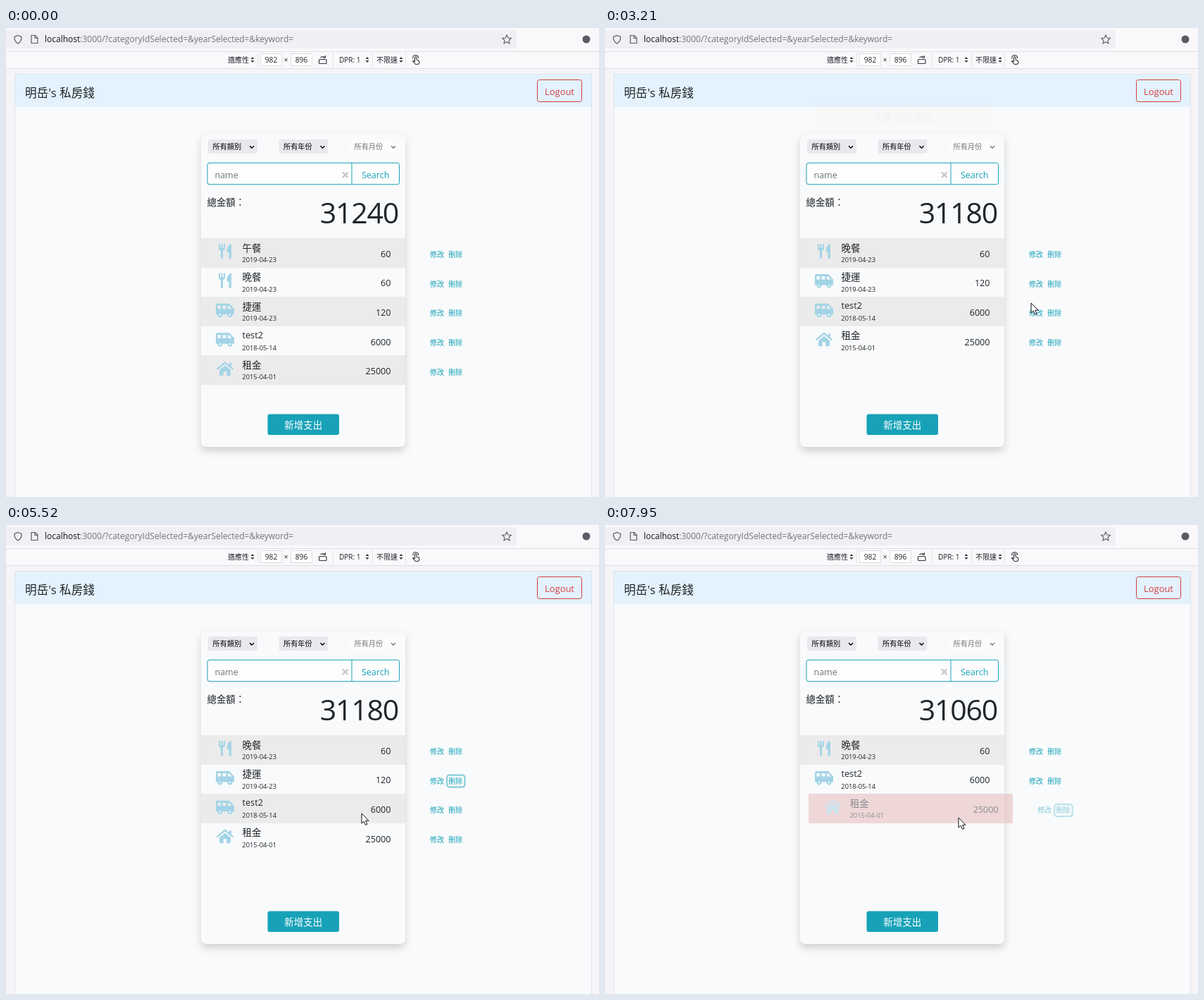
An HTML page that plays this animation: 842 by 665 pixels, repeating every 8 s.

```html
<!DOCTYPE html>
<html lang="zh-Hant">
<head>
<meta charset="utf-8">
<title>私房錢</title>
<style>
html, body { margin: 0; width: 100%; height: 100%; overflow: hidden; background: #f5f5f7; }
svg { display: block; width: 100vw; height: 100vh; }
text { font-family: 'Open Sans', 'Noto Sans CJK TC', 'Noto Sans CJK', sans-serif; white-space: pre; }
</style>
</head>
<body>
<svg id="stage" viewBox="0 0 842 665" xmlns="http://www.w3.org/2000/svg"></svg>
<script>
const LOOP = 8000, ROW_TOP = 298, ROW_H = 41.6;
const TEAL = '#17a2b8', INK = '#212529', ICON = '#a3d4e6', PAPER = '#f9fafb', RED = '#d63d40';

const items = [
  { icon: 'food', name: '午餐', date: '2019-04-23', cost: 60, kind: '餐飲食品' },
  { icon: 'food', name: '晚餐', date: '2019-04-23', cost: 60, kind: '餐飲食品' },
  { icon: 'van', name: '捷運', date: '2019-04-23', cost: 120, kind: '交通出行' },
  { icon: 'van', name: 'test2', date: '2018-05-14', cost: 6000, kind: '交通出行' },
  { icon: 'home', name: '租金', date: '2015-04-01', cost: 25000, kind: '家居物業' }
];

// One entry per deletion, times in ms
const removals = [
  { item: 0, click: 960, open: 1090, ok: 2720, close: 2870, slide: 2930, load: 3190 },
  { item: 2, click: 4000, open: 4140, ok: 5390, close: 5510, slide: 5560, load: 5760 },
  { item: 4, click: 6470, open: 6700, ok: 7670, close: 7810, slide: 7890, load: 9000 }
];

// Pointer path: time, x, y
const path = [
  [70, 781, 543], [830, 640, 322], [1400, 640, 322], [1920, 512, 409],
  [3000, 512, 409], [3210, 605, 390], [3600, 640, 364], [4200, 640, 364],
  [4360, 592, 380], [4900, 505, 409], [5600, 505, 409], [6350, 638, 399],
  [6740, 638, 399], [7060, 508, 411], [7130, 502, 415]
];

const clamp = v => Math.max(0, Math.min(1, v));
const text = (x, y, s, size, fill = INK, extra = '') =>
  `<text x="${x}" y="${y}" font-size="${size}" fill="${fill}" ${extra}>${s}</text>`;
const rect = (x, y, w, h, fill, extra = '') =>
  `<rect x="${x}" y="${y}" width="${w}" height="${h}" fill="${fill}" ${extra}/>`;
const line = (d, color, w = 1, extra = '') =>
  `<path d="${d}" fill="none" stroke="${color}" stroke-width="${w}" ${extra}/>`;
const MID = 'text-anchor="middle"', END = 'text-anchor="end"';

const icons = {
  food: `<path fill="${ICON}" d="M302 8v6q0 3 3 3.6V29h3V17.6q3-.6 3-3.6V8h-2v6h-1.5v-6h-2v6h-1.5v-6zM320 8q-6 1-6.5 12h3v9h3.5z"/>`,
  van: `<path fill="${ICON}" fill-rule="evenodd" d="M300 9.5H317L324 17V25H298V11.5Q298 9.5 300 9.5ZM300.5 12.5h4.5v4.5h-4.5zM307.5 12.5h5v4.5h-5zM315 12.5h1.5l4.5 4.5h-6z"/>
    <g fill="#fff" stroke="${ICON}" stroke-width="2.2"><circle cx="304" cy="25.5" r="2.3"/><circle cx="318" cy="25.5" r="2.3"/></g>`,
  home: line('M299.5 19.5L311 10L322.5 19.5', ICON, 2.3) + rect(317, 10.5, 3, 5, ICON) +
    `<path fill="${ICON}" d="M303 20.5L311 14L319 20.5V28.5H313.3V22.5H308.7V28.5H303Z"/>`
};

function browserBar() {
  const grey = '#5b5b66';
  return rect(0, 0, 842, 33, '#f9f9fb') + rect(-6, 3, 731, 26, '#f0f0f4', 'rx="4"') +
    line('M17 10.5L22 12.5Q22.5 19 17 22Q11.5 19 12 12.5Z', grey, 1.2) +
    line('M36 10.5H41.5L45 14V21.5H36ZM41 10.5V14.5H45', grey, 1.2) +
    text(55, 20, 'localhost<tspan fill="#73737c">:3000/?categoryIdSelected=&amp;yearSelected=&amp;keyword=</tspan>', 12, '#15141a') +
    line('M711 10L712.9 14L717.3 14.5L714 17.5L715 22L711 19.7L707 22L708 17.5L704.7 14.5L709.1 14Z', grey, 1.1) +
    `<circle cx="824" cy="16" r="5.5" fill="${grey}"/>`;
}

function toolBar() {
  const dark = '#38383d';
  const arrows = x => `<path fill="${dark}" d="M${x - 2.5} 44L${x} 41L${x + 2.5} 44ZM${x - 2.5} 46L${x} 49L${x + 2.5} 46Z"/>`;
  const box = x => rect(x, 36.5, 30, 17, '#fff', 'stroke="#dedee3"');
  return rect(0, 33, 842, 24, '#f9f9fb') + line('M0 33.5H842M0 57.5H842', '#dfdfe4') +
    line('M357.5 35V55M464.5 35V55M520.5 35V55M567.5 35V55', '#e2e2e6') +
    text(315, 48.5, '適應性', 10) + arrows(350) + box(361.5) + box(404.5) +
    text(376.5, 49, '982', 10.3, INK, MID) + text(397.5, 49, '×', 10, INK, MID) + text(419.5, 49, '896', 10.3, INK, MID) +
    rect(444.5, 44.5, 10.5, 6, 'none', `rx="1" stroke="${dark}" stroke-width="1.2"`) +
    line('M446.5 42Q449 39.5 453 41.5M450.500 42H453.500V39', dark, 1.1) +
    text(473, 48.5, 'DPR: 1', 10) + arrows(513) + text(526, 48.5, '不限速', 10) + arrows(561) +
    line('M580.5 48V41.5Q582 40 583 41.5V45L586.5 46.5Q587.5 51 584.5 51.5H581.5L577.5 47Q578.5 46 580.5 48M578 43.5Q577 39 581.5 38.5Q586 39 585.5 43', dark, 1.1);
}

function select(x, label, off) {
  const color = off ? '#73737c' : '#000';
  return rect(x, 158, 70, 20, off ? '#fcfcfc' : '#e9e9ed', 'rx="3"') +
    text(x + 6.5, 172, label, 10.2, color, off ? '' : 'font-weight="500"') +
    line(`M${x + 59} 167.2L${x + 62} 170.2L${x + 65} 167.2`, color, 1.4);
}

function page() {
  return rect(0, 57, 842, 608, '#f5f5f7') + rect(12.5, 65.5, 819, 620, PAPER, 'stroke="#dfe2e8"') +
    rect(13, 66, 818, 46, '#e3f2fd') + text(27, 97.5, "明岳's 私房錢", 16.6) +
    rect(754.5, 73.5, 63, 31, 'none', `rx="3" stroke="${RED}"`) + text(786, 95, 'Logout', 12.9, RED, MID) +
    rect(277, 150, 290, 444, PAPER, 'rx="7" style="filter:drop-shadow(0 6px 6px rgba(0,0,0,.15)) drop-shadow(0 0 .6px rgba(0,0,0,.12))"') +
    select(287, '所有類別') + select(387.5, '所有年份') + select(488, '所有月份', true) +
    rect(286, 191.3, 272.5, 30.5, '#fdfdfd', `rx="3" stroke="${TEAL}"`) + line('M491 191V222', TEAL) +
    text(296.5, 212.5, 'name', 12.5, '#6c757d') + line('M478 204.5L485.5 212M485.5 204.5L478 212', '#c4c6c8', 2.4) +
    text(524.7, 212.5, 'Search', 12.6, TEAL, MID) + text(285.5, 251.5, '總金額：', 13.4) +
    rect(371.5, 547.5, 101.5, 29.5, TEAL, 'rx="3"') + text(422.2, 568, '新增支出', 13.5, '#fff', MID);
}

function rowMarkup(it) {
  const latin = /\w/.test(it.name);
  return '<g>' + rect(277, 0, 290, ROW_H, 'none', 'class="bg" shape-rendering="crispEdges"') + icons[it.icon] +
    text(335.5, latin ? 17.3 : 18.7, it.name, latin ? 12.7 : 13.5) + text(335.3, 34, it.date, 9.35) +
    text(546.5, 26.8, it.cost, 12.6, INK, END) + text(602, 27.3, '修改', 10, TEAL) +
    rect(626, 15, 25.5, 17, 'none', `rx="3.5" stroke="${TEAL}" stroke-opacity=".5" stroke-width="2.2" class="ring"`) +
    rect(627, 16, 23.5, 15, TEAL, 'rx="2.5" class="fill"') + text(628.3, 27.3, '刪除', 10, TEAL, 'class="del"') + '</g>';
}

function dialog() {
  const ink = '#15141a';
  return rect(254, 267, 339.5, 170.5, '#fff', 'rx="6" style="filter:drop-shadow(0 2px 6px rgba(0,0,0,.3))"') +
    `<g fill="none" stroke="${ink}" stroke-width="1.1"><circle cx="274" cy="288" r="5.8"/><ellipse cx="274" cy="288" rx="2.6" ry="5.8"/><path d="M268.5 286H279.5M268.5 290H279.5"/></g>` +
    text(284, 291.3, 'localhost:3000', 10.1, ink, 'font-weight="600"') +
    [0, 1, 2, 3].map(i => text(267.5, 319.7 + i * 12.5, '', 10, ink, 'class="info"')).join('') +
    text(267.5, 382, '確定刪除嗎?', 10, ink) +
    rect(480.5, 398, 46.5, 26.5, '#0250bb', 'rx="3" id="ok"') + rect(534, 398, 46.5, 26.5, '#f0f0f2', 'rx="3"') +
    text(503.7, 415.2, '確定', 10.2, '#fff', MID + ' font-weight="600"') +
    text(557.2, 415.2, '取消', 10.2, ink, MID + ' font-weight="600"');
}

const stage = document.getElementById('stage');
stage.innerHTML = page() +
  text(557, 277.3, '', 41, INK, END + ' letter-spacing="-1.2" id="total"') +
  '<g id="rows">' + items.map(rowMarkup).join('') + '</g>' +
  '<g id="banner">' + rect(297.3, 106.2, 249.5, 32.6, '#f8d7da', 'rx="3" stroke="#f5c6cb"') +
  text(422.5, 130, '', 13.3, '#721c24', MID + ' id="note"') + '</g>' +
  toolBar() + rect(0, 33, 842, 632, '#1c1b22', 'id="shade"') +
  browserBar() + '<g id="dialog">' + dialog() + '</g>' +
  `<g id="pointer"><circle r="10.5" fill="#f4e24a" fill-opacity=".65" id="press"/>
   <path d="M0 0V14.2L3.2 11.2L5.5 16.4L7.9 15.4L5.7 10.3H10Z" fill="#fff" stroke="#111" stroke-linejoin="round"/></g>`;

const $ = id => document.getElementById(id);
const set = (el, name, value) => el.setAttribute(name, value);
const show = (el, on) => set(el, 'visibility', on ? 'visible' : 'hidden');
const put = (el, s) => { if (el.textContent !== s) el.textContent = s; };
const rows = [...$('rows').children].map(g => ({
  g, bg: g.querySelector('.bg'), ring: g.querySelector('.ring'),
  fill: g.querySelector('.fill'), del: g.querySelector('.del')
}));
const info = [...document.querySelectorAll('.info')];

function pointerAt(t) {
  const i = path.findIndex(p => p[0] > t);
  if (i === 0) return path[0].slice(1);
  if (i < 0) return path[path.length - 1].slice(1);
  const [t0, x0, y0] = path[i - 1], [t1, x1, y1] = path[i];
  const k = (t - t0) / (t1 - t0);
  return [x0 + (x1 - x0) * k, y0 + (y1 - y0) * k];
}

function drawRows(t, mx, my, job) {
  const gone = removals.filter(r => t >= r.load).map(r => r.item);
  const busy = removals.some(r => t >= r.open && t < r.load + 100);
  let place = 0, total = 0;
  items.forEach((it, i) => {
    const r = rows[i], alive = !gone.includes(i);
    set(r.g, 'display', alive ? 'inline' : 'none');
    if (!alive) return;
    const top = ROW_TOP + place * ROW_H, mine = job.item === i;
    const sliding = mine && t >= job.slide;
    const p = sliding ? clamp((t - job.slide) / 200) : 0;
    const hover = !busy && t >= 70 && my >= top && my < top + ROW_H && mx > 277 && mx < 662;
    const over = hover && mx > 626 && mx < 652 && my > top + 14 && my < top + 33;
    const modal = mine && t >= job.open && t < job.close;
    const filled = over || modal;
    set(r.g, 'transform', `translate(${40 * p} ${top})`);
    set(r.g, 'opacity', Math.max(0, 1 - 1.6 * p));
    set(r.bg, 'fill', sliding ? '#e7b7b8' : hover ? '#dfeff4' : place % 2 ? 'none' : '#ebebeb');
    show(r.fill, filled);
    show(r.ring, mine && t >= job.click && !modal);
    set(r.del, 'fill', filled ? '#fff' : TEAL);
    total += it.cost;
    place++;
  });
  put($('total'), String(total));
}

function drawBanner(t) {
  const last = removals.filter(r => t >= r.load).pop();
  const p = last ? (t - last.load) / 2100 : 1;
  set($('banner'), 'opacity', clamp(Math.min(p * 4, (1 - p) * 4)));
  if (last) put($('note'), items[last.item].name + ' 刪除成功');
}

function drawDialog(t, mx, my, job) {
  const shown = t >= job.open && t < job.close ? clamp((t - job.open) / 140) : 0;
  set($('shade'), 'opacity', 0.45 * shown);
  set($('dialog'), 'opacity', shown);
  const it = items[job.item];
  ['名稱：' + it.name, '日期：' + it.date, '類別：' + it.kind, '金額：' + it.cost].forEach((s, i) => put(info[i], s));
  const over = mx > 480 && mx < 527 && my > 398 && my < 425;
  set($('ok'), 'fill', t >= job.ok ? '#053e94' : over ? '#0250bb' : '#0061e0');
}

function draw(t) {
  const [mx, my] = pointerAt(t);
  const job = removals.find(r => t < r.load);
  drawRows(t, mx, my, job);
  drawBanner(t);
  drawDialog(t, mx, my, job);
  show($('pointer'), t >= 70);
  set($('pointer'), 'transform', `translate(${mx} ${my})`);
  set($('press'), 'opacity', [job.click, job.ok].some(s => t >= s && t < s + 130) ? 1 : 0);
}

const start = performance.now();
function tick() {
  draw((performance.now() - start) % LOOP);
  requestAnimationFrame(tick);
}
tick();
</script>
</body>
</html>
```
